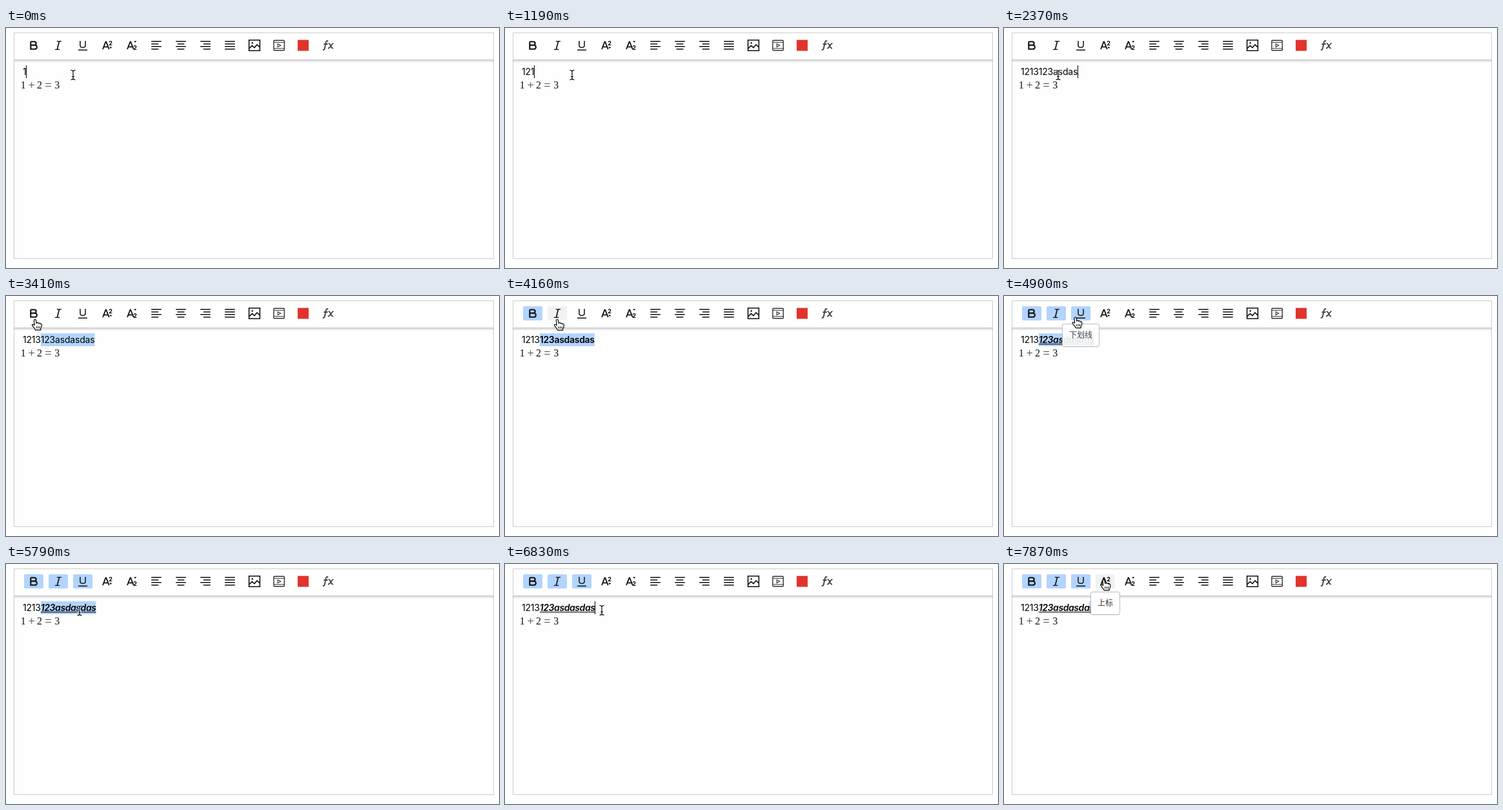
Recreate the animation shown at these times as an HTML page. Size 764 by 373 pixels, loop 8000 ms.

```html
<!DOCTYPE html>
<html lang="zh-CN">
<head>
<meta charset="utf-8">
<title>Rich text editor</title>
<style>
html, body { margin: 0; width: 100%; height: 100%; overflow: hidden; background: #fff; }
svg { display: block; }
.ln { fill: none; stroke: #111; stroke-width: 1.5; }
.txt { font: 14px Inter, sans-serif; letter-spacing: -.2px; fill: #000; }
.small { font: 700 9px Inter, sans-serif; }
.math { font: 16px "Liberation Serif", serif; fill: #111; }
.math .op { font-size: 18.5px; fill: #444; }
.tip { font: 12px "Noto Sans CJK SC", "Noto Sans CJK", sans-serif; fill: #333; }
.bold { font-weight: 600; letter-spacing: -.3px; }
.italic { font-style: italic; letter-spacing: -.42px; }
</style>
</head>
<body>
<svg width="764" height="373" viewBox="0 0 764 373">
  <defs>
    <linearGradient id="shade" x2="0" y2="1">
      <stop stop-color="#000" stop-opacity=".15"/><stop offset="1" stop-color="#000" stop-opacity="0"/>
    </linearGradient>
  </defs>
  <rect x="12.5" y="7.5" width="743" height="351" fill="#fefefe" stroke="#ccc"/>
  <rect x="13" y="8" width="742" height="41" fill="#fff"/>
  <rect x="12" y="49" width="744" height="1" fill="#c8c8c8"/>
  <rect x="12" y="50" width="744" height="4" fill="url(#shade)"/>
  <g id="buttons"></g>
  <g class="ln">
    <path stroke-width="2.1" d="M38.3 21.2V32.8H44.8a3.1 3.1 0 0 0 0-6.2H38.3M38.3 21.2H44a2.7 2.7 0 0 1 0 5.4"/>
    <path stroke-width="1.2" stroke-linecap="round" d="M79.2 20.6H85.6M76.3 33.4H82.8"/>
    <path stroke-width="1.7" d="M82.5 20.8L79.4 33.2"/>
    <path d="M114.95 20V27C114.95 29.2 116.6 30.3 119 30.3C121.4 30.3 123.05 29.2 123.05 27V20M112 34.25H126"/>
    <path id="lines" stroke-linecap="round"/>
    <path stroke-width="1.6" d="M376.6 18.8H393.4V35.2H376.6ZM377 31.6L381.5 27.3L385 30.6L389 25.8L393 29.6"/>
    <circle cx="381.7" cy="23.3" r="1.2" fill="#111" stroke="none"/>
    <rect x="414.9" y="19.2" width="16.4" height="15.6" rx="1" stroke="#333" stroke-width="1.4"/>
    <path stroke="#333" stroke-width="1.1" d="M421.2 24.4L425.8 27L421.2 29.6ZM415 22.2H431M415 31.8H431"/>
    <path stroke="#444" stroke-width="1.9" d="M499.3 20.4C496.8 19.3 496 21 495.6 23.2L494 31C493.5 33.6 492.6 34.4 490.8 33.6M492.6 25H498.6"/>
    <path stroke="#444" stroke-width="1.8" d="M499.8 24C503 23.2 503 32.6 507 31.4M507.5 23.8C504.5 24 502.5 31.6 499 31.6"/>
  </g>
  <g id="scripts"></g>
  <rect x="452" y="18.5" width="17" height="17" fill="#e0342c"/>
  <rect id="sel" y="58" height="20" fill="#b2d4ff"/>
  <text class="txt" id="line" x="26" y="73"><tspan id="plain"></tspan><tspan id="rich"></tspan></text>
  <rect id="under" y="74.2" height="1.1"/>
  <rect id="caret" y="58" width="1" height="20"/>
  <text class="math" y="94.4"><tspan x="22.8">1</tspan><tspan class="op" x="34.6" dy="1">+</tspan><tspan x="48" dy="-1">2</tspan><tspan class="op" x="60.2" dy="1">=</tspan><tspan x="75.3" dy="-1">3</tspan></text>
  <g id="tip">
    <rect id="tipShade" y="45" height="35" rx="3" fill="#000" opacity=".07"/>
    <rect id="tipBox" y="43.5" height="35" rx="2.5" fill="#fff" stroke="#bbb"/>
    <text class="tip" id="tipText" y="65.3" text-anchor="middle"></text>
  </g>
  <g id="beam" fill="none" stroke-linecap="round">
    <path id="beamEdge" stroke="#fff" stroke-width="2.8"/>
    <path id="beamCore" stroke="#000" stroke-width="1.2"/>
  </g>
  <g id="hand">
    <g transform="scale(1.08)" fill="#fff" stroke="#000" stroke-width="1.1" stroke-linejoin="round">
      <path d="M-1.5 1.6C-1.6 -.4 1.1 -.6 1.4 1.4L2.1 5.6C2.3 4.2 4.5 4.3 4.8 5.9C5 4.9 7 5.1 7.2 6.7C7.5 5.7 9.5 6 9.6 7.8C9.7 11 9.3 11.7 8 13.4V15.4H.6C0 13.5 -2.4 11 -3.9 8.9C-5 7.2 -3 6.3 -.8 8.4Z"/>
      <path stroke-width=".9" d="M2 10V13.2M4.3 10V13.2M6.5 10V13.2"/>
    </g>
  </g>
  <path id="arrow" fill="#000" stroke="#fff" d="M0 0V14.5L3.3 11.4L5.6 16.6L7.9 15.6L5.6 10.5H10.2Z"/>
</svg>
<script>
const $ = id => document.getElementById(id);
const set = (id, attrs) => { for (const k in attrs) $(id).setAttribute(k, attrs[k]); };
const show = (id, on) => set(id, { visibility: on ? 'visible' : 'hidden' });

const LOOP = 8000, TEXT = '1213123asdasdas', SPLIT = 4;
const TIPS = ['粗体', '斜体', '下划线', '上标'];
const buttonX = i => 43 + 38 * i;

// Toolbar pieces that repeat
$('buttons').innerHTML = TIPS.map((_, i) =>
  `<rect id="btn${i}" x="${buttonX(i) - 15}" y="16" width="30" height="22" rx="2"/>`).join('');
$('scripts').innerHTML = [[150, 27, 'M160.2 31.2H164.2L162.2 28.8Z'], [188, 34, 'M198.2 20.2H202.2L200.2 22.8Z']]
  .map(([x, y, tri]) => `<path class="ln" style="stroke-width:1.8" d="M${x} 33L${x + 4.5} 21.5H${x + 5.2}L${x + 9.7} 33M${x + 1.7} 29.3H${x + 8}"/>
    <text class="small" x="${x + 9.2}" y="${y}">2</text><path d="${tri}"/>`).join('');
let d = '';
for (let i = 0; i < 4; i++) for (let row = 0; row < 4; row++) {
  const w = row % 2 && i < 3 ? 9.9 : 14.5;
  d += `M${225.75 + 38 * i + (14.5 - w) * [0, .5, 1, 0][i]} ${20.75 + 4 * row}h${w}`;
}
set('lines', { d });
const beam = 'M-3 -7.3Q-.5 -7.3 0 -5.8Q.5 -7.3 3 -7.3M0 -5.8V5.8M-3 7.3Q-.5 7.3 0 5.8Q.5 7.3 3 7.3M-1.5 2.5H1.5';
set('beamEdge', { d: beam });
set('beamCore', { d: beam });

// Each step changes some of the state; n: typed characters, sel: first selected, fmt: styles applied
const steps = [
  [0, { n: 1, caret: 1, sel: -1, fmt: 0, cur: 'beam', x: 104, y: 73, hover: -1, tip: -1, fade: 1 }],
  [450, { caret: 0 }],
  [890, { caret: 1 }],
  [1190, { n: 3 }],
  [1490, { n: 5 }],
  [1630, { n: 7 }],
  [2080, { n: 8, x: 103 }],
  [2230, { n: 10, x: 96 }],
  [2370, { n: 12, x: 84 }],
  [2520, { n: 15, x: 118 }],
  [2670, { x: 172 }],
  [2820, { x: 150 }],
  [2960, { caret: 0, sel: 7, x: 80 }],
  [3110, { sel: 4, x: 56 }],
  [3260, { x: 48, y: 60 }],
  [3410, { cur: 'hand', x: 45, y: 36.3 }],
  [3560, { hover: 0, y: 35, tip: 0, fade: .6 }],
  [3710, { fade: 1 }],
  [3860, { fmt: 1 }],
  [4010, { hover: -1, x: 63, y: 37, fade: .4 }],
  [4160, { hover: 1, x: 81, y: 36.5, tip: -1 }],
  [4310, { y: 36, tip: 1, fade: .8 }],
  [4460, { fmt: 2, fade: 1 }],
  [4600, { x: 92, y: 35, fade: .5, hover: -1 }],
  [4750, { x: 110.5, y: 33, hover: 2, tip: -1 }],
  [4900, { fmt: 3, tip: 2, fade: .9 }],
  [5050, { fade: 1 }],
  [5200, { x: 135, y: 36, hover: -1, fade: .4 }],
  [5350, { cur: 'arrow', x: 178, y: 38, tip: -1 }],
  [5490, { cur: 'beam', x: 172, y: 75 }],
  [5640, { x: 136, y: 74 }],
  [5790, { x: 114, y: 72.5 }],
  [6090, { x: 122, y: 73 }],
  [6240, { x: 144, sel: -1, caret: 1 }],
  [6380, { x: 154 }],
  [6530, { x: 158, y: 72 }],
  [6830, { x: 150 }],
  [7130, { x: 146 }],
  [7280, { x: 138, y: 73, caret: 0 }],
  [7430, { x: 132, sel: 14 }],
  [7720, { cur: 'hand', x: 149, y: 30, hover: 3 }],
  [7870, { x: 154.5, y: 24.3, tip: 3, fade: 1 }]
];

function stateAt(t) {
  const s = {};
  for (const [at, change] of steps) if (at <= t) Object.assign(s, change);
  return s;
}

function draw(t) {
  const s = stateAt(t), line = $('line');
  $('plain').textContent = TEXT.slice(0, Math.min(s.n, SPLIT));
  $('rich').textContent = TEXT.slice(SPLIT, Math.max(s.n, SPLIT));
  $('rich').setAttribute('class', (s.fmt > 0 ? 'bold ' : '') + (s.fmt > 1 ? 'italic' : ''));
  const end = line.getEndPositionOfChar(s.n - 1).x;
  const startOf = i => line.getStartPositionOfChar(i).x;

  show('sel', s.sel >= 0);
  if (s.sel >= 0) set('sel', { x: startOf(s.sel), width: end - startOf(s.sel) });
  show('under', s.fmt > 2);
  if (s.fmt > 2) set('under', { x: startOf(SPLIT), width: end - startOf(SPLIT) });
  show('caret', s.caret);
  set('caret', { x: Math.round(end - .3) });

  TIPS.forEach((_, i) => {
    const on = i < s.fmt;
    show('btn' + i, on || s.hover === i);
    set('btn' + i, { fill: on ? '#b2d4ff' : '#f2f2f2' });
  });

  show('tip', s.tip >= 0);
  if (s.tip >= 0) {
    const label = TIPS[s.tip], width = label.length * 12 + 21, x = buttonX(s.tip) - width / 2;
    set('tip', { opacity: s.fade });
    set('tipShade', { x, width });
    set('tipBox', { x, width });
    set('tipText', { x: buttonX(s.tip) });
    $('tipText').textContent = label;
  }

  for (const id of ['beam', 'hand', 'arrow']) {
    show(id, s.cur === id);
    set(id, { transform: `translate(${s.x} ${s.y})` });
  }
}

function tick() {
  draw(performance.now() % LOOP);
  requestAnimationFrame(tick);
}
tick();
</script>
</body>
</html>
```
